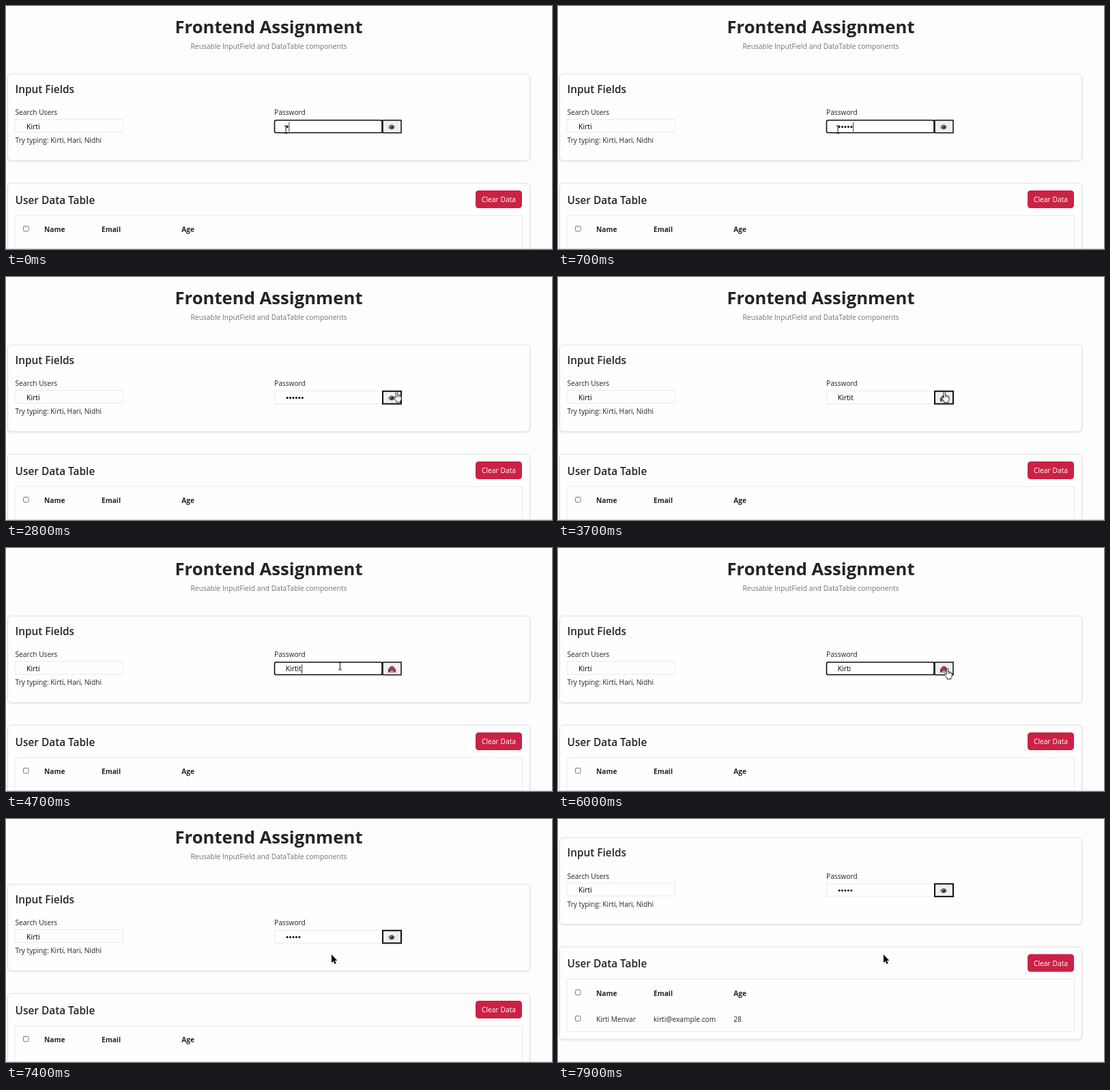
An HTML page for the animation above (8000 ms loop, 800 px wide and 357 px high).

```html
<!DOCTYPE html>
<html lang="en">
<head>
<meta charset="utf-8">
<title>Frontend Assignment</title>
<style>
  html, body { margin: 0; width: 100%; height: 100%; overflow: hidden; background: #fdfdfd; }
  svg { display: block; width: 800px; height: 357px; }
  text { font: 10.2px "Open Sans", "Noto Sans", sans-serif; fill: #212529; white-space: pre; }
  .title { font-size: 25.7px; font-weight: 700; text-anchor: middle; }
  .sub { font-size: 10.3px; fill: #6c757d; text-anchor: middle; }
  .head { font-size: 15.4px; font-weight: 600; }
  .th { font-weight: 700; }
  .val { font-size: 10.4px; fill: #000; }
  .btn { font-size: 10.3px; fill: #fff; text-anchor: middle; }
  .card { fill: #fefefe; stroke: #dfe0e2; filter: drop-shadow(0 1px 1px rgba(0, 0, 0, .1)); }
  .line { fill: none; stroke: #ebebeb; }
  .check { fill: #fff; stroke: #767676; }
</style>
</head>
<body>
<svg viewBox="0 0 800 357">
  <g id="page">
    <text class="title" x="385" y="40">Frontend Assignment</text>
    <text class="sub" x="385" y="63">Reusable InputField and DataTable components</text>

    <rect class="card" x="2.5" y="100" width="765" height="127" rx="5"/>
    <text class="head" x="13.5" y="127.5">Input Fields</text>
    <text x="13.5" y="160">Search Users</text>
    <rect class="line" x="13.5" y="166.5" width="158" height="19"/>
    <text class="val" x="30" y="180.5">Kirti</text>
    <text x="13.5" y="201">Try typing: Kirti, Hari, Nidhi</text>

    <text x="393" y="160">Password</text>
    <rect class="line" x="393.5" y="167.5" width="158" height="19"/>
    <rect id="focus" x="393.5" y="167.8" width="157.5" height="18.4" rx="2.5" fill="#fff" stroke="#101010" stroke-width="1.6"/>
    <text id="plain" class="val" x="409.7" y="181"></text>
    <g id="dots"></g>
    <rect id="caret" y="171" width="1" height="13.5" fill="#333"/>

    <rect id="toggle" x="552" y="167.8" width="27" height="18.6" fill="#eeeff1" stroke="#111"/>
    <g id="eye">
      <ellipse cx="565" cy="178" rx="4.6" ry="3.5" fill="#aaa0a8"/>
      <circle cx="565.2" cy="178" r="3" fill="#74475f"/>
      <circle cx="565.4" cy="178.2" r="1.6" fill="#2c1525"/>
      <circle cx="564.2" cy="176.9" r=".7" fill="#eadde5"/>
      <path d="M560.4 178Q565 171.8 569.6 178" fill="none" stroke="#5f4d58" stroke-width=".9"/>
    </g>
    <g id="monkey">
      <circle cx="560.8" cy="179" r="1.8" fill="#bd7485"/>
      <circle cx="570.2" cy="179" r="1.8" fill="#bd7485"/>
      <path d="M560.8 181C560 171 571 171 570.2 181Q565.5 185 560.8 181Z" fill="#94455a"/>
      <ellipse cx="565.5" cy="180.8" rx="3.2" ry="2.2" fill="#d795a0"/>
      <path d="M559.8 183Q560 177.5 565.2 177.3L564.8 180Q562 180.3 562 183ZM571.2 183Q571 177.5 565.8 177.3L566.2 180Q569 180.3 569 183Z" fill="#7a3048"/>
      <path d="M564.3 182Q565.5 182.8 566.7 182" fill="none" stroke="#642638" stroke-width=".7"/>
    </g>

    <rect class="card" x="2.5" y="260.3" width="765" height="136" rx="5"/>
    <text class="head" x="13.5" y="290.5">User Data Table</text>
    <rect x="688" y="271" width="68" height="26" rx="4.5" fill="#cb2144"/>
    <text class="btn" x="722" y="288.4">Clear Data</text>
    <rect class="line" x="13.5" y="307.9" width="743" height="77"/>
    <rect class="check" x="25.5" y="323.4" width="7.5" height="7.5" rx="1.5"/>
    <text class="th" x="56" y="332">Name</text>
    <text class="th" x="140" y="332">Email</text>
    <text class="th" x="257.3" y="332">Age</text>
    <rect class="check" x="25.5" y="361.9" width="7.5" height="7.5" rx="1.5"/>
    <text x="56" y="370.2">Kirti Menvar</text>
    <text x="140" y="370.2">kirti@example.com</text>
    <text x="257.3" y="370.2">28</text>
  </g>

  <rect y="356" width="800" height="1" fill="#cbdce2"/>

  <g id="mouse">
    <path id="beam" d="M-2.5 -5.5H-.7L0 -5L.7 -5.5H2.5M0 -5V5M-2.5 5.5H-.7L0 5L.7 5.5H2.5" fill="none" stroke="#111"/>
    <g id="hand">
      <path d="M-1.3 1Q-1.2 -.5 0 -.5T1.3 1V5Q2.6 4.3 3.4 5.4Q4.8 4.9 5.3 6.2Q6.8 6 6.8 7.6V10.5Q6.7 12.4 5.4 13.8V15.5H-.5V14Q-2.4 12 -4.4 8.8Q-4.3 7 -2.8 7.8L-1.3 9.2Z" fill="#fff" stroke="#111" stroke-width=".9"/>
      <path d="M1.3 5V8M3.4 5.6V8.2M5.3 6.4V8.4" stroke="#111" stroke-width=".7"/>
    </g>
    <path id="arrow" d="M0 0V12.2L2.7 9.7L4.7 14L6.7 13.1L4.8 9H8.3Z" fill="#000" stroke="#fff" stroke-width=".8" paint-order="stroke"/>
  </g>
</svg>
<script>
const LOOP = 8000, STEP = 100;
const SECRET = "Kirtit";
const SHOW = 2900, HIDE = 6200, ERASE = 5100;
const $ = id => document.getElementById(id);
const show = (id, on) => $(id).setAttribute("visibility", on ? "visible" : "hidden");

// [time, characters in the password field]
const keys = [[0, 1], [200, 2], [400, 3], [500, 4], [600, 5], [900, 6], [ERASE, 5]];
// [time the field gains focus, time it loses it]
const focusSpans = [[0, 2600], [4300, HIDE - 100]];
// [time, x, y] of the pointer's hot spot
const path = [
  [0, 410, 181.5], [1900, 410, 181.5], [2500, 572.5, 168.5], [3600, 572.5, 168.5],
  [4200, 489.5, 173.5], [5400, 489.5, 173.5], [5900, 570.5, 177], [6400, 570.5, 177],
  [6900, 477, 199]
];
const scrolls = [[0, 0], [7000, 0], [7200, 4], [7400, 4], [7800, 72.5]];

for (let i = 0; i < SECRET.length; i++) {
  const dot = document.createElementNS("http://www.w3.org/2000/svg", "circle");
  dot.setAttribute("cx", 412.1 + 4.45 * i);
  dot.setAttribute("cy", 177.6);
  dot.setAttribute("r", 1.5);
  $("dots").append(dot);
}

function along(points, t) {
  const i = points.findIndex(p => p[0] > t);
  if (i < 0) return points.at(-1).slice(1);
  const [t0, ...a] = points[i - 1], [t1, ...b] = points[i];
  const u = (t - t0) / (t1 - t0), e = u * u * (3 - 2 * u);
  return a.map((v, k) => v + (b[k] - v) * e);
}

function drawField(t) {
  const [keyTime, count] = keys.findLast(k => k[0] <= t);
  const span = focusSpans.find(([from, to]) => t >= from && t < to);
  const open = t >= SHOW && t < HIDE;
  const text = SECRET.slice(0, count);

  $("plain").textContent = text;
  show("plain", open);
  [...$("dots").children].forEach((d, i) =>
    d.setAttribute("visibility", !open && i < count ? "visible" : "hidden"));
  show("eye", !open);
  show("monkey", open);

  show("focus", span);
  const pressed = !span && (t < 4300 || t >= HIDE - 100);
  $("toggle").setAttribute("stroke-width", pressed ? 2 : 1.5);

  const since = span ? t - Math.max(span[0], keyTime) : 0;
  const width = open ? $("plain").getComputedTextLength() : 4.45 * count;
  $("caret").setAttribute("x", 409.9 + width);
  show("caret", span && since % 1000 < 500);
}

function drawMouse(t) {
  const [x, y] = along(path, t);
  const row = y > 167 && y < 187;
  const kind = row && x > 551 && x < 580 ? "hand" : row && x > 393 && x <= 551 ? "beam" : "arrow";
  for (const k of ["hand", "beam", "arrow"]) show(k, k === kind);
  $("mouse").setAttribute("transform", `translate(${x} ${y})`);
}

function frame(now) {
  const t = Math.floor((now % LOOP) / STEP) * STEP;
  $("page").setAttribute("transform", `translate(0 ${-along(scrolls, t)[0]})`);
  drawField(t);
  drawMouse(t);
  requestAnimationFrame(frame);
}
requestAnimationFrame(frame);
</script>
</body>
</html>
```
